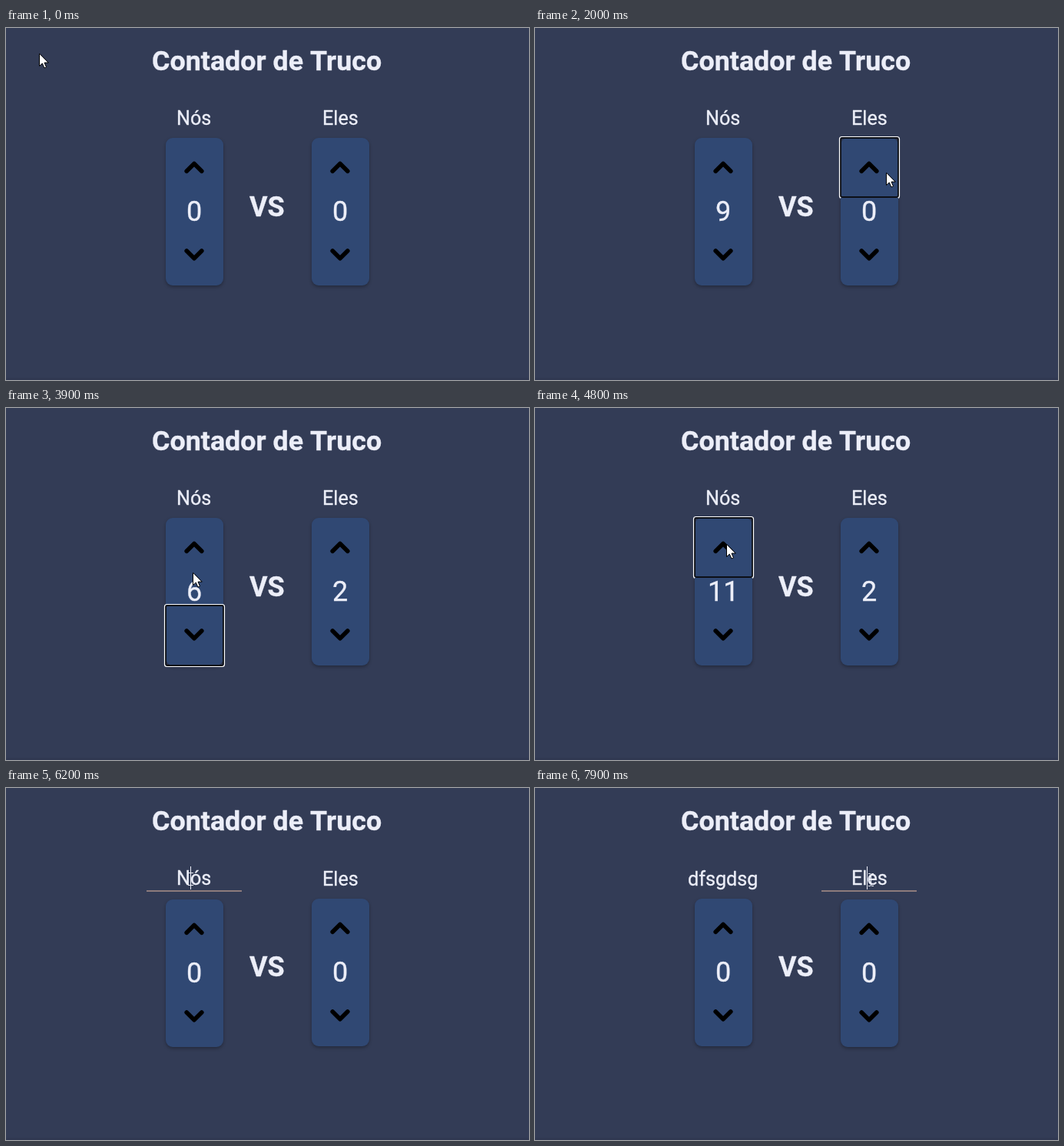
An HTML page with a canvas for the animation above (8000 ms loop, 681 by 458 pixels).

```html
<!DOCTYPE html>
<html lang="pt">
<head>
<meta charset="utf-8">
<title>Contador de Truco</title>
<style>
html, body { margin: 0; height: 100%; overflow: hidden; background: #333c56; }
canvas { display: block; }
</style>
</head>
<body>
<canvas id="stage" width="681" height="458"></canvas>
<script>
const c = document.getElementById('stage').getContext('2d');
const BG = '#333c56', CARD = '#304873', INK = '#eceef8', ACCENT = '#8d7b7c', SELECT = '#0670ea';
const LOOP = 8000, STEP = 100;
const WIN = 4900, RESET = 5600, MARK = 6800, TYPE = 7300;

// Pointer moves; on arrival the named control takes the focus
const moves = [
  { from: 0, to: 0, x: 43, y: 33, focus: '' },
  { from: 0, to: 400, x: 248, y: 178, focus: 'us up' },
  { from: 1700, to: 2000, x: 457, y: 188, focus: 'them up' },
  { from: 2600, to: 2900, x: 450, y: 288, focus: 'them down' },
  { from: 3100, to: 3400, x: 230, y: 288, focus: 'us down' },
  { from: 3700, to: 4000, x: 249, y: 177, focus: 'us up' },
  { from: 5100, to: 5400, x: 338, y: 249, focus: 'again' },
  { from: RESET, to: 6200, x: 240, y: 118, focus: 'us name' },
  { from: 7500, to: 7900, x: 437, y: 119, focus: 'them name' }
];

// Clicks made so far in a steady run of n
const run = (t, start, gap, n) => Math.max(0, Math.min(n, Math.floor((t - start) / gap) + 1));
const score = {
  us: t => run(t, 375, 162, 9) - run(t, 3500, 165, 3) + run(t, 4100, 150, 5),
  them: t => run(t, 2100, 165, 4) - run(t, 2900, 200, 2)
};

function pointerAt(t) {
  const i = moves.findLastIndex(m => m.from <= t);
  const b = moves[i], a = moves[Math.max(0, i - 1)];
  const k = Math.min(1, (t - b.from) / (b.to - b.from));
  return [a.x + (b.x - a.x) * k, a.y + (b.y - a.y) * k].map(Math.round);
}

function rect(x, y, w, h, color) {
  c.fillStyle = color;
  c.fillRect(x, y, w, h);
}

function round(x, y, w, h, r) {
  c.beginPath();
  c.roundRect(x, y, w, h, r);
}

function lines(points) {
  c.beginPath();
  points.forEach(p => c.lineTo(...p));
}

// Centred text, slightly thickened
function text(str, cx, y, size, weight = 400, back) {
  c.font = `${weight} ${size}px Roboto, sans-serif`;
  const w = c.measureText(str).width, x = Math.floor(cx - w / 2);
  if (back) rect(x, y - 24, w, 30, back);
  c.fillStyle = c.strokeStyle = INK;
  c.lineWidth = .35;
  c.lineJoin = 'round';
  c.fillText(str, x, y);
  c.strokeText(str, x, y);
  return x;
}

function card(x, y, w, h) {
  c.save();
  c.shadowColor = 'rgba(0,0,0,.3)';
  c.shadowBlur = 4;
  c.shadowOffsetY = 2;
  c.fillStyle = CARD;
  round(x, y, w, h, 9);
  c.fill();
  c.restore();
}

function ring(x, y, w, h) {
  c.lineWidth = 2;
  c.strokeStyle = '#0c0f16';
  round(x + 1.5, y + 1.5, w - 3, h - 3, 2);
  c.stroke();
  c.lineWidth = 1.2;
  c.strokeStyle = '#fff';
  round(x, y, w, h, 3);
  c.stroke();
}

function chevron(x, y, dir) {
  lines([[x - 9.8, y + 5 * dir], [x, y - 4.8 * dir], [x + 9.8, y + 5 * dir]]);
  c.lineJoin = c.lineCap = 'round';
  c.lineWidth = 5.6;
  c.strokeStyle = '#000';
  c.stroke();
}

function column(id, x, t, focus, name, clicked) {
  const mid = x + 37.5, named = focus === id + ' name';
  const drop = named ? 2 : focus.endsWith('name') ? 1 : 0;
  const marked = named && t >= MARK && t < TYPE;

  const left = text(name, mid, drop === 1 ? 127 : 126, 25.2, 400, marked && SELECT);
  if (named) {
    rect(x - 25, 133, 124, 2, ACCENT);
    if (!marked) rect(Math.round(left + c.measureText(clicked).width), 102, 1, 30, INK);
  }

  card(x, 143 + drop, 75, 192);
  if (focus === id + ' up') {
    ring(x - 1.5, 141.5, 78, 80);
    rect(x, 221, 75, 8, CARD);
  }
  if (focus === id + ' down') ring(x - 1.5, 255.5, 78, 81);
  chevron(mid - .5, 181.2 + drop, 1);
  chevron(mid - .5, 295 + drop, -1);
  text(t < RESET ? score[id](t) : 0, mid, 251 + drop, 36);
}

function result(t, focus) {
  card(148, 105, 385, 250);
  if (t > WIN) rect(258, 168, 17, 29, SELECT);
  text('O vencedor foi:', 340.5, 191, 24, 700);
  text('Nós', 340.5, 210, 19);
  c.fillStyle = ACCENT;
  round(310.5, 233.5, 59, 55, 27);
  c.fill();
  c.fillStyle = c.strokeStyle = INK;
  c.lineWidth = 3.6;
  c.lineCap = 'butt';
  c.beginPath();
  c.arc(339.5, 261, 7.8, .5, 5.5);
  c.stroke();
  lines([[349.5, 251], [349.5, 259.5], [341, 259.5]]);
  c.fill();
  if (focus === 'again') ring(308.5, 231.5, 63, 59);
}

function arrow(x, y) {
  c.save();
  c.translate(x + .5, y + .5);
  lines([[0, 0], [0, 16], [3.8, 12.6], [6.4, 18.5], [9, 17.4], [6.5, 11.6], [11.4, 11.6]]);
  c.closePath();
  c.fillStyle = '#fff';
  c.strokeStyle = '#000';
  c.lineWidth = 1;
  c.fill();
  c.stroke();
  c.restore();
}

function beam(x, y) {
  rect(x, y - 7, 1, 15, INK);
  for (const dy of [-8, 8]) {
    rect(x - 3, y + dy, 3, 1, INK);
    rect(x + 1, y + dy, 3, 1, INK);
  }
}

function draw(t) {
  const { focus } = moves.findLast(m => m.to <= t);
  rect(0, 0, 681, 458, BG);
  rect(0, 455, 681, 3, '#303851');
  text('Contador de Truco', 340.5, 55, 35.85, 700);
  if (t >= WIN && t < RESET) result(t, focus);
  else {
    const typed = 'dfsgdsg'.slice(0, Math.max(0, Math.ceil((t - TYPE + 100) / 40)));
    const us = t < TYPE ? 'Nós' : typed;
    column('us', 208, t, focus, us, t < TYPE ? 'N' : us);
    column('them', 398, t, focus, 'Eles', 'El');
    text('VS', 340.5, 245, 36, 700);
  }
  (focus.endsWith('name') ? beam : arrow)(...pointerAt(t));
}

function frame(now) {
  draw(Math.floor(now % LOOP / STEP) * STEP);
  requestAnimationFrame(frame);
}
requestAnimationFrame(frame);
</script>
</body>
</html>
```
